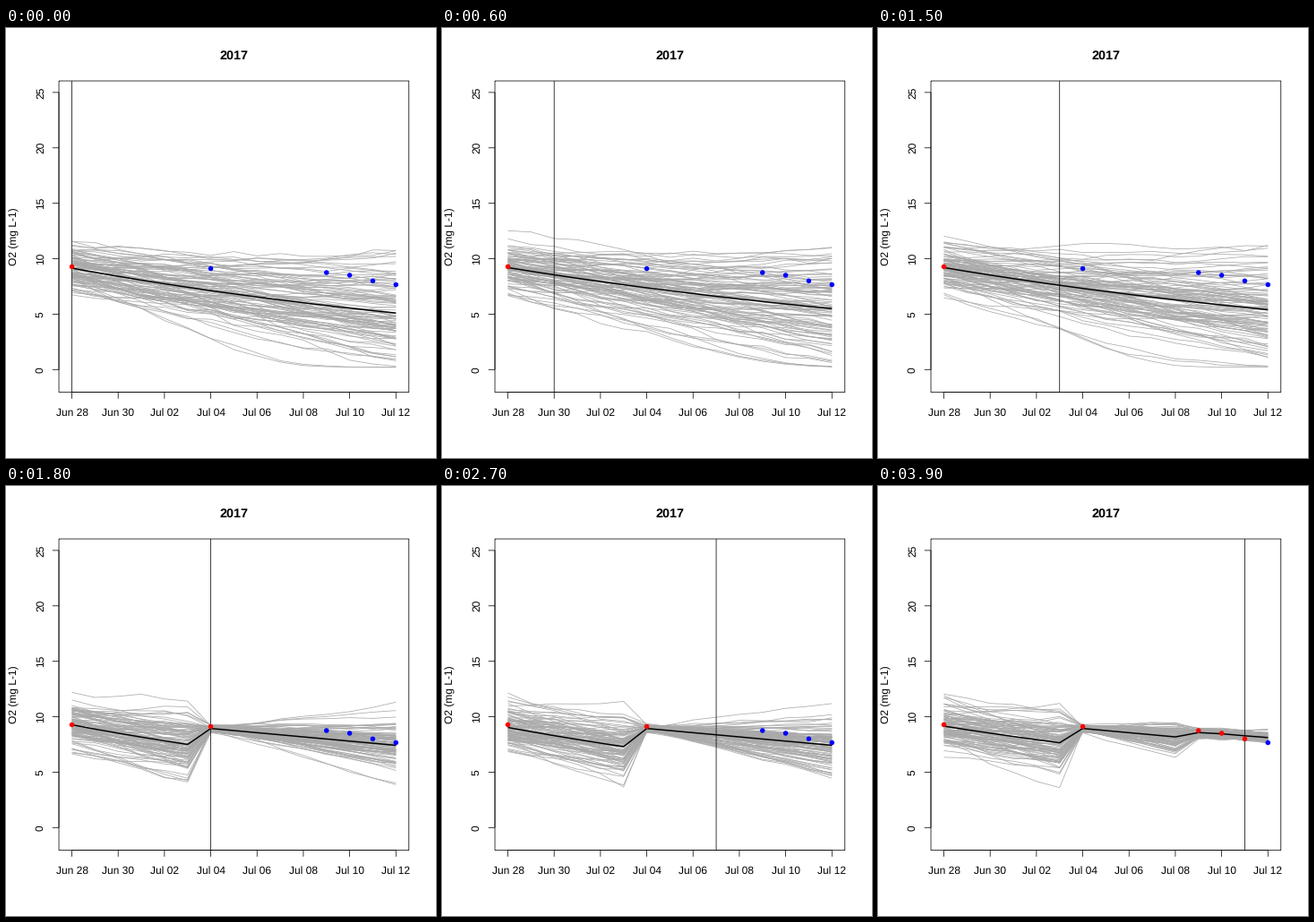
A matplotlib script for the animation above (4200 ms loop, 480 px wide and 480 px high).

```python
import numpy as np
import matplotlib.pyplot as plt
from matplotlib.animation import FuncAnimation
from matplotlib.collections import LineCollection

SIZE, DPI = 480, 72
LEFT, RIGHT, TOP, BOTTOM = 59.04, 449.76, 59.04, 406.56
TICK, THIN = 7.2, 0.75
LAST_DAY, MEMBERS = 14, 100
GRAY = "#a9a9a9"

OBS_DAYS = np.array([0, 6, 11, 12, 13, 14])
OBS_O2 = np.array([9.28, 9.11, 8.75, 8.51, 8.0, 7.66])

# Ensemble mean of each daily run: at the start, and at the end of its first stretch
START = [9.15, 9.17, 9.2, 9.25, 9.2, 9.2, 9.27, 9.2, 9.15, 9.03, 9.2, 9.35, 9.2, 9.15]
FIRST_END = [5.1, 5.3, 5.5, 5.4, 5.4, 5.4, 7.5, 7.45, 7.4, 7.3, 7.6, 7.9, 7.7, 7.65]

# Restart day: (mean after the update, daily change, spread, spread of daily change)
UPDATES = {
    6: (8.94, -0.19, 0.17, 0.15),
    11: (8.57, -0.11, 0.23, 0.12),
    12: (8.46, -0.13, 0.23, 0.1),
    13: (8.28, -0.16, 0.23, 0.12),
}

plt.rcParams["font.family"] = "Liberation Sans"
plt.rcParams["path.snap"] = False
plt.rcParams["text.hinting"] = "no_hinting"


def px(day):
    return 73.51 + 25.841 * np.asarray(day)


def py(o2):
    return 381.31 - 12.376 * np.asarray(o2)


def unit_normals(rng):
    z = np.clip(rng.normal(size=MEMBERS), -2.9, 2.9)
    return (z - z.mean()) / z.std()


def forecast(run):
    """Mean and member curves of the forecast issued on day `run`."""
    rng = np.random.default_rng(2017 + run)
    mean = np.zeros(LAST_DAY + 1)
    members = np.zeros((MEMBERS, LAST_DAY + 1))
    starts = [0] + [d for d in UPDATES if d <= run]
    stops = [d - 1 for d in starts[1:]] + [LAST_DAY]
    rank = unit_normals(rng)
    for first, last in zip(starts, stops):
        t = np.arange(last - first + 1)
        if first == 0:
            level = START[run] * (FIRST_END[run] / START[run]) ** (t / last)
            spread, drift, noise = 1.1, 0.17, 0.18
        else:
            base, change, spread, drift = UPDATES[first]
            level = base + change * t
            noise = 0.1
        slope = drift * unit_normals(rng)
        wobble = rng.normal(0, noise, (MEMBERS, t.size))
        wobble[:, 0] = 0
        dev = spread * rank[:, None] + slope[:, None] * t + wobble.cumsum(axis=1)
        mean[first:last + 1] = level
        members[:, first:last + 1] = level + dev
        rank = 0.7 * dev[:, -1] / dev[:, -1].std() + 0.7 * unit_normals(rng)
    # Concentrations flatten out above zero
    members = 0.2 + np.logaddexp(0, 1.6 * (members - 0.2)) / 1.6
    return mean, members


fig = plt.figure(figsize=(SIZE / DPI, SIZE / DPI), dpi=DPI, facecolor="white")
ax = fig.add_axes([0, 0, 1, 1])
ax.set(xlim=(0, SIZE), ylim=(SIZE, 0))
ax.axis("off")


def stroke(xs, ys, width=THIN, z=4):
    return ax.plot(xs, ys, color="black", lw=width, zorder=z, snap=False,
                   solid_capstyle="butt", solid_joinstyle="round")[0]


def label(x, y, text, size=12, **kw):
    ax.text(x, y, text, fontsize=size, ha="center", va="baseline",
            rotation_mode="anchor", **kw)


stroke([LEFT, RIGHT, RIGHT, LEFT, LEFT], [TOP, TOP, BOTTOM, BOTTOM, TOP])
stroke(px([0, 14]), [BOTTOM, BOTTOM])
stroke([LEFT, LEFT], py([0, 25]))
for day in range(0, 15, 2):
    stroke([px(day)] * 2, [BOTTOM, BOTTOM + TICK])
    label(px(day), 432.6, f"Jun {28 + day}" if day < 3 else f"Jul {day - 2:02d}")
for o2 in range(0, 26, 5):
    stroke([LEFT - TICK, LEFT], [py(o2)] * 2)
    label(41.8, py(o2), str(o2), rotation=90)
label(254.4, 35, "2017", size=14.4, weight="bold")
label(13, 232.8, "O2 (mg L-1)", rotation=90)

ensemble = LineCollection([], colors=GRAY, linewidths=THIN, zorder=1)
ax.add_collection(ensemble)
mean_line = stroke([], [], width=2 * THIN, z=2)
today = stroke([], [], z=3)
dots = ax.scatter(px(OBS_DAYS), py(OBS_O2), s=5.5 ** 2, linewidths=0, zorder=5)

DAY_X = px(np.arange(LAST_DAY + 1))


def draw(run):
    mean, members = forecast(run)
    ensemble.set_segments([np.column_stack([DAY_X, py(m)]) for m in members])
    mean_line.set_data(DAY_X, py(mean))
    today.set_data([px(run)] * 2, [TOP, BOTTOM])
    dots.set_facecolor(["red" if d <= run else "blue" for d in OBS_DAYS])
    return ensemble, mean_line, today, dots


anim = FuncAnimation(fig, draw, frames=14, interval=300, repeat=True, repeat_delay=0)
plt.show()
```
